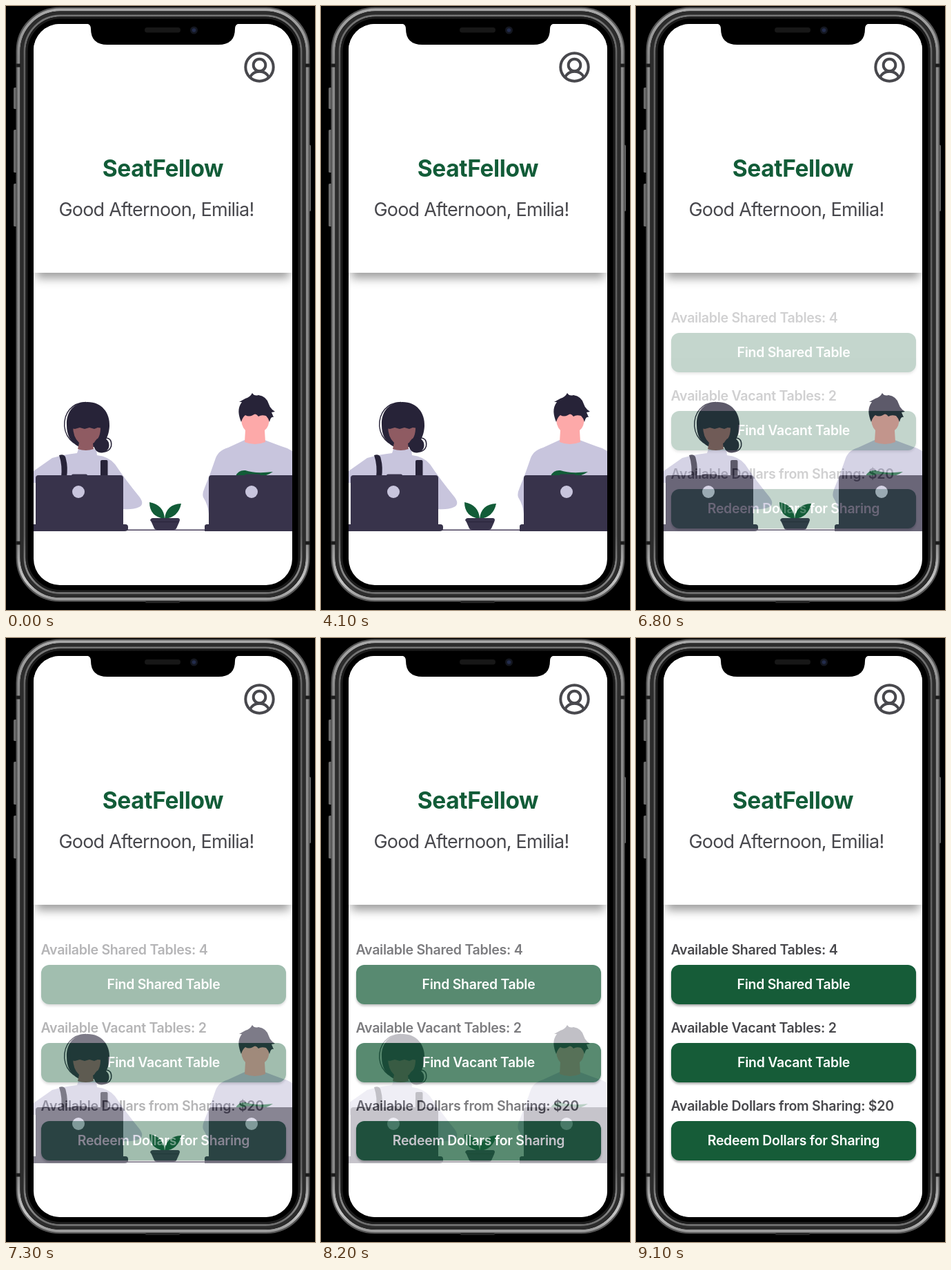
Animation of 448x874 px, one loop 9.4 s. Source, as an HTML page:

```html
<!DOCTYPE html>
<html lang="en">
<head>
<meta charset="utf-8">
<title>SeatFellow</title>
<style>
  html, body { margin: 0; width: 100%; height: 100%; overflow: hidden; background: #000; }
  svg { display: block; width: 100%; height: 100%; font-family: Inter, "Open Sans", sans-serif; }
  .brand { font-size: 33.5px; font-weight: 700; letter-spacing: -.4px; fill: #125c38; }
  .greeting { font-size: 27px; letter-spacing: -.8px; fill: #48484d; }
  .label, .action { font-size: 19.6px; font-weight: 600; letter-spacing: -.3px; fill: #48484c; }
  .action { font-size: 19.4px; letter-spacing: -.23px; fill: #fff; text-anchor: middle; }
  .hair { fill: #272338; }
  .cloth { fill: #c8c5dd; }
  .device { fill: #38334b; }
  .leaf { fill: #125c38; }
</style>
</head>
<body>
<svg viewBox="0 0 448 874">
  <defs>
    <clipPath id="screen"><rect x="40" y="26" width="375" height="812" rx="38"/></clipPath>
    <linearGradient id="metal" x2="0" y2="1">
      <stop offset="0" stop-color="#a8a8a8"/>
      <stop offset=".08" stop-color="#8a8a8a"/>
      <stop offset=".9" stop-color="#8a8a8a"/>
      <stop offset=".97" stop-color="#c4c4c4"/>
      <stop offset="1" stop-color="#9a9a9a"/>
    </linearGradient>
    <filter id="cardShadow" filterUnits="userSpaceOnUse" x="0" y="300" width="448" height="150">
      <feDropShadow dx="0" dy="8" stdDeviation="7" flood-opacity=".38"/>
    </filter>
    <filter id="buttonShadow" x="-5%" y="-20%" width="110%" height="150%">
      <feDropShadow dx="0" dy="2.5" stdDeviation="1.5" flood-opacity=".32"/>
    </filter>
    <g id="laptop" class="device">
      <rect x="43" y="679" width="127" height="76" rx="4"/>
      <rect x="95" y="677.5" width="23" height="4" rx="2"/>
      <path d="M37 760V753Q37 750 41 750H173Q177 750 177 754V756Q177 760 172 760Z"/>
      <circle cx="105" cy="703" r="9" fill="#c8c5dd"/>
    </g>
  </defs>

  <rect width="448" height="874"/>

  <!-- Phone body -->
  <g fill="#6a6a6a">
    <rect x="11" y="118" width="5" height="31" rx="1.5"/>
    <rect x="11" y="179" width="5" height="62" rx="1.5"/>
    <rect x="11" y="257" width="5" height="62" rx="1.5"/>
    <rect x="437" y="201" width="5" height="96" rx="1.5"/>
  </g>
  <g fill="none">
    <rect x="16" y="3" width="423" height="857.5" rx="62" stroke="#555" stroke-width="3"/>
    <rect x="18.500" y="5.500" width="418" height="852.500" rx="60" stroke="url(#metal)" stroke-width="4"/>
    <rect x="23" y="10" width="409" height="843.500" rx="56" stroke="#2c2c2c" stroke-width="5"/>
    <rect x="27" y="14" width="401" height="835.500" rx="52" stroke="url(#metal)" stroke-width="3" opacity=".7"/>
    <rect x="30" y="17" width="395" height="829.500" rx="49" stroke="#1c1c1c" stroke-width="3"/>
    <path d="M14 86H21M434 86H441M14 777H21M434 777H441" stroke="#1c1c1c" stroke-width="5"/>
  </g>
  <rect x="202" y="861" width="50" height="3" rx="1.500" fill="#242424"/>

  <g clip-path="url(#screen)">
    <rect x="40" y="26" width="375" height="812" fill="#fff"/>

    <!-- Woman -->
    <path class="cloth" d="M105 641Q118 637 131 642L132 650Q149 652 158 663Q172 684 194 711Q201 721 193 725Q184 729 170 728V690H40V673L67 654Q84 649 103 647Z"/>
    <path class="hair" d="M77 650Q86 647 87 656Q90 667 88 682H80Q82 665 77 650Z"/>
    <rect class="hair" x="137" y="657" width="10.5" height="25" rx="2"/>
    <path d="M116 573.500C95 574 84 589 84.700 608Q86 623 98 632" fill="none" stroke="#272338" stroke-width="1.400"/>
    <path class="hair" d="M88 606C87 586 100 573 118 573C139 573 151 589 150 608C149 624 143 635 128 638H106C93 631 88 621 88 606Z"/>
    <path d="M97 607H137Q138 626 126 633L127 641Q116 645 104 641L106 632Q97 624 97 607Z" fill="#8f5b62"/>
    <path class="hair" d="M93 598H141V611L133 610L128 612L121 610L114 612L107 610L100 612L94 611Z"/>
    <path d="M144 625Q154 625 152.500 637Q150 644 143 645" fill="none" stroke="#272338" stroke-width="1.600"/>
    <circle class="hair" cx="138.500" cy="635.500" r="11"/>

    <!-- Man -->
    <path class="cloth" d="M346 628Q361 634 375 628Q388 633 399 637Q411 640 420 648V735H294Q293 722 286 711Q284 706 288 697Q296 678 303 657Q307 643 322 639Z"/>
    <path d="M341 592C341 582 381 580 382 594Q382 609 375 614L376 631Q361 637 346 631L347 614Q340 607 341 592Z" fill="#fda9a9"/>
    <path class="hair" d="M341 602C337 592 335 582 342 573L338 573L347 568Q354 566 357 560Q360 565 366 563Q378 565 381 576Q382 580 386 584L390 587L385 588L388 595Q384 593 382 602Q381 597 377 593Q370 591 366 594Q362 588 358 592Q352 595 347 592Q343 595 341 602Z"/>
    <path class="leaf" d="M333 680Q337 671 347 672Q361 677 387 674Q378 680 368 681Z"/>

    <!-- Desk -->
    <path d="M170 758.300H295" stroke="#493f5c" stroke-width="1.400"/>
    <path class="leaf" d="M230 742Q208 739 208 718Q229 722 230 742Q232 721 254 720Q250 740 230 742Z"/>
    <path class="device" d="M213 741H249Q252 741 252 744L251 747L247 756Q246 758 243 758H219Q216 758 215 756L211 747L209 744Q210 741 213 741Z"/>
    <path d="M212 746.500H250" stroke="#29243a" stroke-width="1"/>
    <use href="#laptop"/>
    <use href="#laptop" x="251"/>
    <path class="device" d="M288 760V754Q288 750 293 750H420V760Z"/>

    <!-- Menu, dissolving in -->
    <g id="menu" opacity="0">
      <rect x="40" y="386" width="375" height="452" fill="#fff"/>
    </g>

    <!-- Header card -->
    <rect x="44" y="330" width="367" height="56" fill="#fff" filter="url(#cardShadow)"/>
    <rect x="40" y="26" width="375" height="360" fill="#fff"/>
    <text class="brand" x="227.500" y="247" text-anchor="middle">SeatFellow</text>
    <text class="greeting" x="76.500" y="304">Good Afternoon, Emilia!</text>
    <g fill="none" stroke="#48484d" stroke-width="4">
      <circle cx="367.500" cy="88.500" r="20.200"/>
      <circle cx="367.500" cy="85.500" r="8.800"/>
      <path d="M353.500 103.500A15.500 15.500 0 0 1 381.500 103.500"/>
    </g>
  </g>

  <!-- Notch -->
  <path d="M116 25Q123 26 123 33Q123 56 147 56H308Q332 56 332 33Q332 26 339 25Z"/>
  <rect x="201" y="31" width="52" height="7.500" rx="3.750" fill="#171717"/>
  <circle cx="272.500" cy="35" r="5.500" fill="#141720"/>
  <circle cx="272.500" cy="35" r="2.800" fill="#232c4c"/>
</svg>
<script>
  const LOOP = 9400, TICK = 100;
  const fade = [[5200, 0], [5700, .03], [6200, .1], [6700, .22], [7300, .4],
                [7800, .57], [8300, .75], [8600, .85], [9100, 1], [LOOP, 1]];
  const rows = [
    ["Available Shared Tables: 4", "Find Shared Table"],
    ["Available Vacant Tables: 2", "Find Vacant Table"],
    ["Available Dollars from Sharing: $20", "Redeem Dollars for Sharing"]
  ];
  const menu = document.getElementById("menu");

  function add(tag, attrs, text = "") {
    const node = document.createElementNS(menu.namespaceURI, tag);
    for (const [key, value] of Object.entries(attrs)) node.setAttribute(key, value);
    node.textContent = text;
    menu.append(node);
  }

  rows.forEach(([label, action], i) => {
    const y = 473 + 113 * i;
    add("text", { class: "label", x: 50.5, y: y - 15 }, label);
    add("rect", { x: 51, y, width: 355, height: 57, rx: 12, fill: "#125c38", filter: "url(#buttonShadow)" });
    add("text", { class: "action", x: 228.5, y: y + 35 }, action);
  });

  function opacityAt(time) {
    const next = fade.findIndex(([at]) => time < at);
    if (next === 0) return 0;
    const [t0, v0] = fade[next - 1], [t1, v1] = fade[next];
    return v0 + (v1 - v0) * (time - t0) / (t1 - t0);
  }

  function draw() {
    const time = Math.floor(performance.now() % LOOP / TICK) * TICK;
    menu.setAttribute("opacity", opacityAt(time));
    requestAnimationFrame(draw);
  }
  draw();
</script>
</body>
</html>
```
